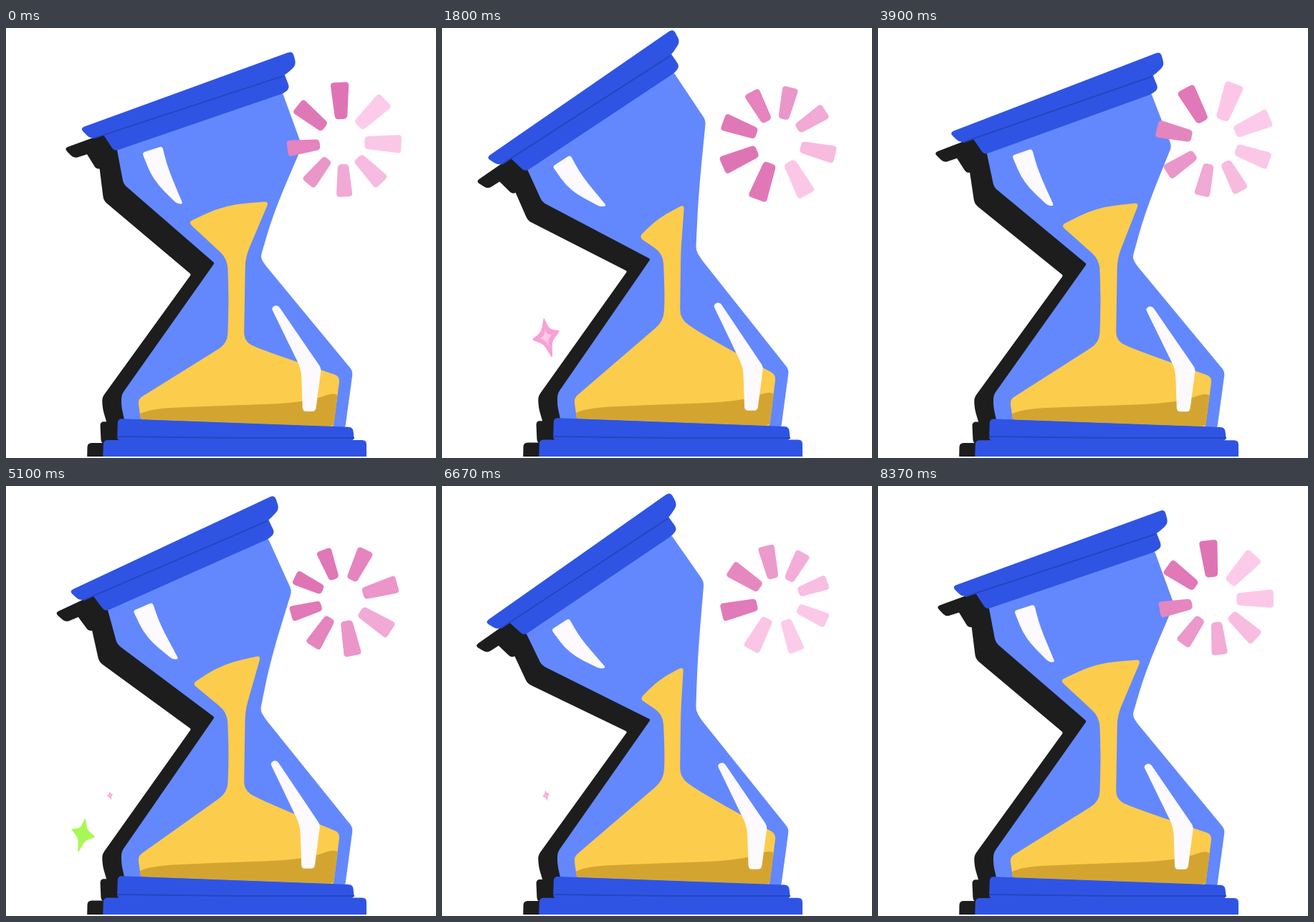
An HTML page with a canvas that plays this animation: 600x600 px, repeating every 8.41 s.

```html
<!DOCTYPE html>
<html lang="en">
<head>
<meta charset="utf-8">
<title>Hourglass</title>
<style>
html, body { margin: 0; width: 100%; height: 100%; overflow: hidden; background: #fff; }
canvas { display: block; width: 600px; height: 600px; }
</style>
</head>
<body>
<canvas id="stage" width="600" height="600"></canvas>
<script>
const ctx = document.getElementById('stage').getContext('2d');
const LOOP = 8410, SWING = LOOP / 2, TAU = Math.PI * 2;
const BLUE = '#2f54e4', SEAM = '#2546bd', SHINE = '#fdfaff';

// Outlines of the upright pose: x, y and, where it differs, the corner rounding.
const glass = [
  [153, 160], [164, 218], [291, 328, 2], [161, 512], [161, 528], [168, 560], [473, 560],
  [484, 479], [361, 330], [355, 320], [374, 256, 60], [413, 165], [385, 88]
];
const sand = [
  [254, 271, 7], [305, 247, 70], [367, 242, 7], [334, 320], [332, 438], [365, 452, 80],
  [466, 486, 8], [457, 556, 3], [188, 546, 3], [184, 518, 7], [309, 440], [311, 380, 150],
  [309, 322]
];
const sandShade = [[180, 532], [300, 527], [420, 523], [470, 503], [470, 562], [180, 562]];
const lidTop = [[103, 140], [400, 32], [405, 52], [388, 67], [118, 155]];
const lidRim = [[132, 143], [386, 58], [396, 84], [388, 91], [151, 172]];
const shineTop = [[190, 174], [218, 165], [226, 196, 25], [247, 246], [238, 245], [205, 212, 25]];
const shineLow = [[370, 390], [379, 386], [440, 475], [432, 535], [414, 535], [412, 476, 12]];
const baseRim = [[156, 545], [484, 557], [486, 576], [155, 576]];
const baseSlab = [[136, 575], [503, 575], [503, 606], [135, 606]];
const starTips = [[-6, -57], [40, -20], [18, 58], [-40, 6]];

const clamp = x => Math.min(1, Math.max(0, x));
const wave = (t, period) => Math.cos(TAU * t / period);

function ease(t, from, to) {
  const x = clamp((t - from) / (to - from));
  return x * x * (3 - 2 * x);
}

const pulse = (t, start, end) => ease(t, start, start + 500) * (1 - ease(t, end - 500, end));

// Polygon with corners cut back and bent through the corner point.
function fillRound(points, color, rounding = 6) {
  const n = points.length;
  const toward = (p, q) => {
    const d = Math.hypot(q[0] - p[0], q[1] - p[1]) || 1;
    const k = Math.min(p[2] ?? rounding, d / 2) / d;
    return [p[0] + (q[0] - p[0]) * k, p[1] + (q[1] - p[1]) * k];
  };
  ctx.beginPath();
  points.forEach((p, i) => {
    ctx.lineTo(...toward(p, points[(i + n - 1) % n]));
    ctx.quadraticCurveTo(p[0], p[1], ...toward(p, points[(i + 1) % n]));
  });
  ctx.closePath();
  ctx.fillStyle = color;
  ctx.fill();
}

function seam(points) {
  ctx.beginPath();
  points.forEach(p => ctx.lineTo(p[0], p[1]));
  ctx.strokeStyle = SEAM;
  ctx.lineWidth = 2;
  ctx.stroke();
}

function hourglass(t) {
  const s = t % SWING;
  const lean = 1.04 * (ease(s, 200, 2050) - ease(s, 2500, 4180));
  const bob = -2 - 4.5 * wave(s - 1350, SWING);

  // The top turns around the neck, and the whole body stretches from the floor.
  const bend = ([x, y, r]) => {
    const angle = 0.253 * lean * clamp((350 - y) / 120);
    const dx = x - 280, dy = y - 330, cos = Math.cos(angle), sin = Math.sin(angle);
    return [
      280 + dx * cos + dy * sin,
      330 - dx * sin + dy * cos + bob * (600 - y) / 290,
      r
    ];
  };
  const cast = ([x, y, r]) => [
    x - 22 - 11 * Math.sin(Math.PI * clamp((y - 140) / 440)),
    y + 4 + 24 * clamp((512 - y) / 370),
    r
  ];
  // Leaning shrinks the sand above and raises the heap below.
  const pour = ([x, y, r]) => {
    const shrink = 1 - 0.36 * lean;
    if (y < 320) {
      x = 322 + (x - 322) * shrink;
      y = 320 + (y - 320) * shrink - (x - 322) * 0.2 * lean;
    } else if (y > 400 && y < 486) {
      y = 486 - (486 - y) * (1 + 0.6 * lean);
    }
    return [x, y, r];
  };
  const slide = ([x, y, r]) => [x + 15 * lean + 1.2 * bob, y, r];
  const paint = (shape, color, rounding) => fillRound(shape.map(bend), color, rounding);

  for (const shape of [glass, lidTop, lidRim, baseRim, baseSlab]) {
    paint(shape.map(cast), '#1d1d1d');
  }
  paint(glass, '#6388fe');
  ctx.save();
  paint(sand.map(pour), '#fccc4c', 14);
  ctx.clip();
  paint(sandShade, '#d3a530', 60);
  ctx.restore();
  paint(shineTop, SHINE, 4);
  paint(shineLow.map(slide), SHINE, 5);
  paint(lidRim, BLUE);
  paint(lidTop, BLUE, 7);
  seam([[122, 154], [387, 67]].map(bend));
  paint(baseRim, BLUE);
  paint(baseSlab, BLUE);
  seam([[155, 570], [320, 572], [486, 572]]);
}

function spinner(t) {
  const scale = 1 + 0.037 * wave(t + 430, SWING / 2);
  const light = [253, 203, 234], dark = [223, 116, 180];
  for (let i = 0; i < 8; i++) {
    const radius = 79 + 4 * wave(i - 1, 8);
    const shade = 0.5 + 0.5 * wave(t - 300 * ((8 - i) % 8), SWING);
    const color = light.map((c, k) => Math.round(c + (dark[k] - c) * shade));
    const outer = radius * 0.28 - 10, inner = radius * 0.2 - 8;
    ctx.save();
    ctx.translate(469, 158.5);
    ctx.rotate(TAU * (t / SWING + i / 8) - 0.045 + 0.085 * Math.sin(TAU * i / 8));
    ctx.scale(scale, scale);
    fillRound([[-outer, -radius], [outer, -radius], [inner, -31], [-inner, -31]], `rgb(${color})`, 5);
    ctx.restore();
  }
}

function star(x, y, width, height, color) {
  if (height < 0.01) return;
  const points = starTips.flatMap((p, i) => {
    const q = starTips[(i + 1) % 4];
    return [[...p, 7], [(p[0] + q[0]) * 0.29, (p[1] + q[1]) * 0.29, 14]];
  });
  ctx.save();
  ctx.translate(x, y);
  ctx.scale(width, height);
  fillRound(points, color);
  ctx.restore();
}

function draw(now) {
  const t = now % LOOP;
  ctx.fillStyle = '#fff';
  ctx.fillRect(0, 0, 600, 600);
  ctx.save();
  ctx.beginPath();
  ctx.rect(0, 0, 600, 598);
  ctx.clip();
  hourglass(t);
  ctx.restore();
  spinner(t);
  const pink = pulse(t, 1550, 3600) + pulse(t, 5000, 6785);
  const lime = 0.43 * (pulse(t, 2620, 3950) + pulse(t, 4500, 6100));
  star(145, 432, pink, pink, '#fa9fd3');
  star(145, 432, pink * 0.42, pink * 0.42, '#fdc9e8');
  star(108, 487, -lime, lime, '#a9f754');
}

const start = performance.now();
function tick() {
  draw(performance.now() - start);
  requestAnimationFrame(tick);
}
tick();
</script>
</body>
</html>
```
